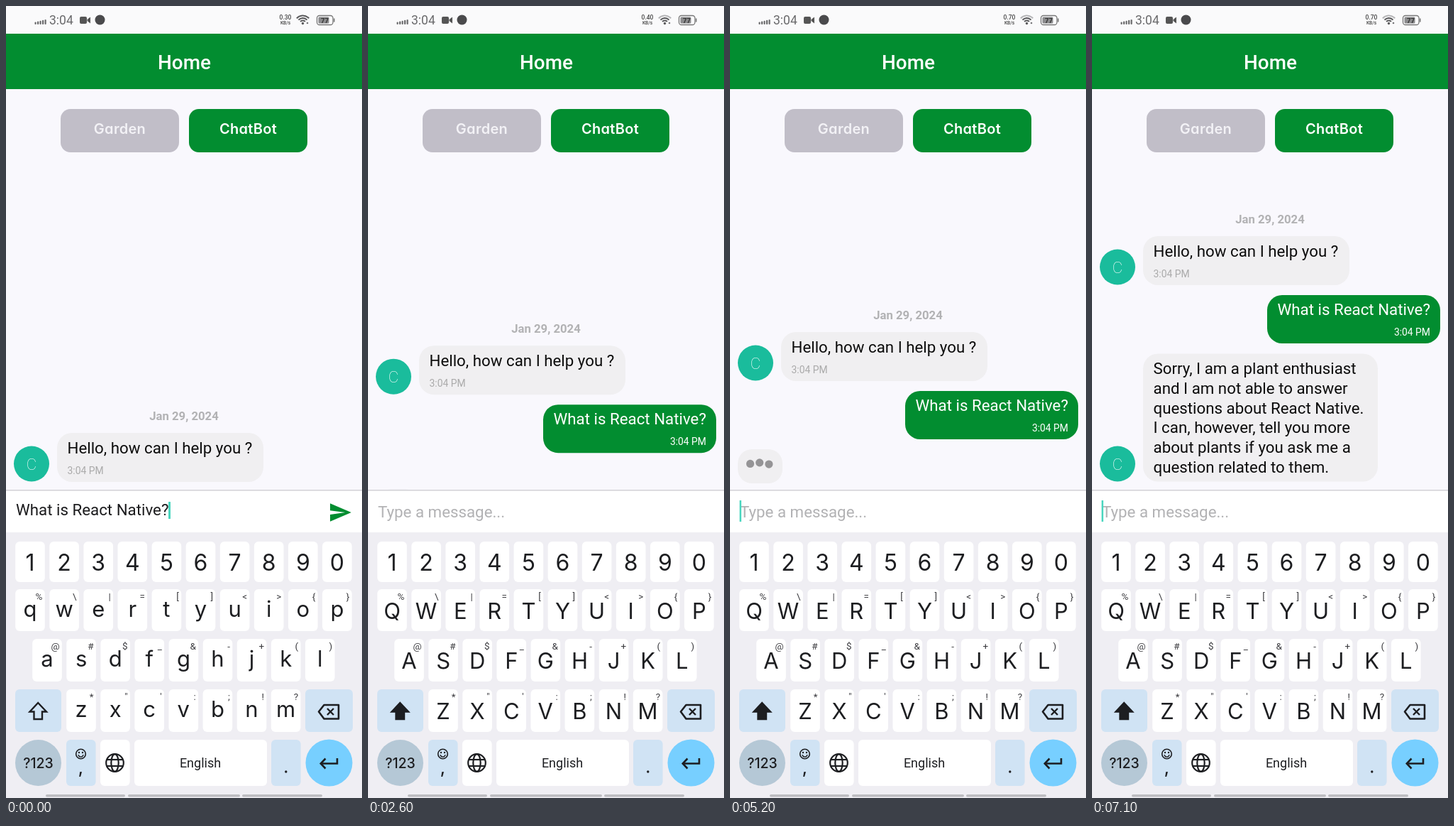
An HTML page with a canvas for the animation above (7.5 s loop, 502 by 1115 pixels).

```html
<!DOCTYPE html>
<html lang="en">
<head>
<meta charset="utf-8">
<title>Chat</title>
<style>
  html, body { margin: 0; width: 100%; height: 100%; overflow: hidden; background: #f9f8fd; }
  canvas { position: absolute; left: 0; top: 0; width: 502px; height: 1115px; }
  .tab {
    position: absolute; top: 145px; width: 167px; height: 61px; border-radius: 14px;
    font: 600 20px/57px Inter, "Open Sans", sans-serif; letter-spacing: .3px;
    font-feature-settings: "cv11"; text-align: center; color: #fff;
  }
  .garden { left: 77px; background: #c1bec8; color: #f3f2f6; }
  .bot { left: 258px; background: #028d30; }
</style>
</head>
<body>
<canvas id="stage"></canvas>
<div class="tab garden">Garden</div>
<div class="tab bot">ChatBot</div>
<script>
const W = 502, H = 1115, LOOP = 7500, STEP = 100;
const GREEN = '#028d30', INK = '#1d1e21', BUBBLE = '#f0eff1', BLUE = '#d0e3f4', ACCENT = '#4bd6bf';
const UI = 'Roboto, sans-serif', KEYS = 'Inter, sans-serif';
const SENT = 2500, ANSWERED = 5500, FROZEN = 5200;
const ANSWER = [
  'Sorry, I am a plant enthusiast', 'and I am not able to answer',
  'questions about React Native.', 'I can, however, tell you more',
  'about plants if you ask me a', 'question related to them.'
];
const ROWS = [
  { keys: 'qwertyuiop', hints: '%\\|=[]<>{}', x: 34, top: 821, h: 59 },
  { keys: 'asdfghjkl', hints: '@#$_&-+()', x: 58, top: 891, h: 60 },
  { keys: 'zxcvbnm', hints: '*"\':;!?', x: 106, top: 962, h: 60 }
];
const SEND = new Path2D('M2 21L23 12 2 3 2 10l15 2-15 2z');

const canvas = document.getElementById('stage');
const ctx = canvas.getContext('2d');
const dpr = window.devicePixelRatio || 1;
canvas.width = W * dpr;
canvas.height = H * dpr;

function rect(x, y, w, h, color) {
  ctx.fillStyle = color;
  ctx.fillRect(x, y, w, h);
}
function round(x, y, w, h, r, color) {
  ctx.fillStyle = color;
  ctx.beginPath();
  ctx.roundRect(x, y, w, h, r);
  ctx.fill();
}
function disc(x, y, r, color) {
  ctx.fillStyle = color;
  ctx.beginPath();
  ctx.arc(x, y, r, 0, Math.PI * 2);
  ctx.fill();
}
function text(str, x, y, font, color, align = 'left') {
  ctx.font = font;
  ctx.fillStyle = color;
  ctx.textAlign = align;
  ctx.fillText(str, x, y);
}
function line(pts, color, width, close) {
  ctx.strokeStyle = color;
  ctx.lineWidth = width;
  ctx.beginPath();
  pts.forEach(([x, y]) => ctx.lineTo(x, y));
  if (close) ctx.closePath();
  ctx.stroke();
}
function arc(x, y, rx, ry, from, to, color, width) {
  ctx.strokeStyle = color;
  ctx.lineWidth = width;
  ctx.beginPath();
  ctx.ellipse(x, y, rx, ry, 0, from, to);
  ctx.stroke();
}

const clamp = v => Math.max(0, Math.min(1, v));
const ease = p => p < .5 ? 2 * p * p : 1 - 2 * (1 - p) * (1 - p);
const ramp = (t, start, len) => ease(clamp((t - start) / len));

// Damped spring from 1 to 0
function spring(ms) {
  const s = Math.max(0, ms) / 1000;
  return Math.exp(-11 * s) * (Math.cos(10.45 * s) + 1.053 * Math.sin(10.45 * s));
}

function statusBar(t) {
  const grey = '#6a6a6c';
  rect(0, 0, W, 39, '#fafafb');
  for (let i = 0; i < 5; i++) round(40.5 + i * 3.5, 22.5 - i * .9, 2.2, 3.5 + i * .9, 1, grey);
  text('3:04', 61, 26, '17.5px ' + UI, grey);
  round(104, 15, 10, 10, 2, '#555');
  ctx.beginPath();
  ctx.moveTo(114.5, 19); ctx.lineTo(119, 15.5); ctx.lineTo(119, 24.5); ctx.lineTo(114.5, 21);
  ctx.fill();
  disc(132.5, 19.5, 7, '#4a4a4c');

  const rate = t < 200 ? '0.30' : t < 2800 ? '0.40' : '0.70';
  text(rate, 394, 19, '500 8.5px ' + UI, '#444', 'center');
  text('KB/s', 394, 26, '500 6.5px ' + UI, '#444', 'center');

  const weak = t >= 2200;
  [4.5, 8, 11.5].forEach((r, i) =>
    arc(418.5, 25, r, r, -Math.PI * .77, -Math.PI * .23, weak && i === 2 ? '#b5b5b7' : '#5a5a5c', 2));
  disc(418.5, 24.5, 1.7, '#5a5a5c');
  disc(425, 24, 1.3, '#77777a');

  ctx.strokeStyle = '#777';
  ctx.lineWidth = 1.3;
  ctx.beginPath();
  ctx.roundRect(438.5, 13.5, 22.5, 13, 3.5);
  ctx.stroke();
  round(440.5, 15.5, 15, 9, 1.5, '#8b8b8d');
  rect(462, 17.5, 1.5, 5, '#777');
  text('77', 449.5, 23.7, '700 9.5px ' + UI, '#333', 'center');
}

function avatar(y) {
  disc(36, y, 25, '#1abc9c');
  text('C', 36, y + 8.5, '100 22.3px ' + UI, '#fff', 'center');
}

function chat(t) {
  const sent = t >= SENT, answered = t >= ANSWERED;
  const open = ramp(t, 2450, 250) * (1 - ramp(t, 5410, 250));
  const shift = 60 * open + (sent ? 82 : 0) + (answered ? 195 : 0);
  const body = '22.3px ' + UI, small = '13.9px ' + UI;

  ctx.save();
  ctx.beginPath();
  ctx.rect(0, 220, W, 461);
  ctx.clip();
  ctx.save();
  ctx.translate(0, -shift);
  text('Jan 29, 2024', 251, 583, '700 16.7px ' + UI, '#b2b2b4', 'center');
  round(72, 601, 291, 69, 21, BUBBLE);
  avatar(644.5);
  text('Hello, how can I help you ?', 86.5, 630, body, '#0c0c0c');
  text('3:04 PM', 86.5, 658.5, small, '#aaa');
  if (sent) {
    round(247, 684, 244, 68, 21, GREEN);
    text('What is React Native?', 261.5, 712, body, '#fff');
    text('3:04 PM', 477, 741, small, '#fff', 'right');
  }
  if (answered) {
    round(72, 766.5, 331, 180, 21, BUBBLE);
    avatar(921.5);
    ANSWER.forEach((s, i) => text(s, 86.5, 795 + i * 27.8, body, '#0c0c0c'));
  }
  ctx.restore();
  if (sent && !answered) typing(t);
  ctx.restore();
}

function typing(t) {
  const drop = 279 * spring(t - 2450);
  const phase = 3.65 + (Math.min(t, FROZEN) - 3400) * .00808;
  round(11, 624 + drop, 63, 48, 20, BUBBLE);
  for (let i = 0; i < 3; i++)
    disc(28.5 + i * 13.2, 647 + 4.18 * Math.sin(phase - i) + drop, 5.6, '#959496');
}

function inputBar(t) {
  const caret = t % 1000 < 500;
  rect(0, 681, W, 60, '#fff');
  rect(0, 681, W, 1.5, '#d2d1d6');
  if (t < SENT) {
    text('What is React Native?', 14, 716.5, '22.3px ' + UI, '#1c1c1e');
    if (caret) rect(229, 698, 3, 24, ACCENT);
    ctx.save();
    ctx.globalAlpha = 1 - .8 * ramp(t, 2250, 150);
    ctx.translate(454.2, 696);
    ctx.scale(1.42, 1.42);
    ctx.fillStyle = GREEN;
    ctx.fill(SEND);
    ctx.restore();
  } else {
    text('Type a message...', 14, 719.5, '22.3px ' + UI, '#b2b2b4');
    if (caret) rect(13.5, 696, 2.5, 30, ACCENT);
  }
}

function letterRow(row, base, caps) {
  [...row.keys].forEach((k, i) => {
    const x = row.x + i * 48.1;
    round(x - 20.8, row.top, 41.6, row.h, 6, '#fff');
    text(caps ? k.toUpperCase() : k, x, base + (caps ? 3 : 0), '31px ' + KEYS, INK, 'center');
    text(row.hints[i], x + 17.5, row.top + 15, '13.5px ' + UI, '#3c3c40', 'right');
  });
}

function keyboard(caps) {
  rect(0, 741, W, H - 741, '#efeef3');
  [...'1234567890'].forEach((k, i) => {
    const x = 34 + i * 48.1;
    round(x - 20.8, 754, 41.6, 57, 6, '#fff');
    text(k, x, 795, '32px ' + KEYS, INK, 'center');
  });
  [860, 930, 1001].forEach((base, i) => letterRow(ROWS[i], base, caps));

  round(13, 962, 65, 60, 6, BLUE);
  const up = [[45.2, 981], [57, 993.5], [51, 993.5], [51, 1004], [39.5, 1004], [39.5, 993.5], [33.5, 993.5]];
  ctx.lineJoin = 'miter';
  line(up, INK, 2.4, true);
  if (caps) {
    ctx.fillStyle = INK;
    ctx.fill();
  }

  round(422, 962, 67, 60, 6, BLUE);
  ctx.lineJoin = 'round';
  line([[441, 993.5], [448.5, 984], [469, 984], [469, 1003.5], [448.5, 1003.5]], INK, 2.6, true);
  line([[453, 989], [462, 998]], INK, 2.4);
  line([[462, 989], [453, 998]], INK, 2.4);

  disc(45.5, 1065.5, 32.5, '#b5c8d6');
  text('?123', 45.5, 1072.5, '500 19.5px ' + KEYS, INK, 'center');

  round(85, 1033, 41.6, 65, 6, BLUE);
  arc(105.5, 1053, 6.8, 6.8, 0, Math.PI * 2, INK, 1.6);
  disc(103, 1051, 1.2, INK);
  disc(108, 1051, 1.2, INK);
  arc(105.5, 1053.5, 3.6, 3.6, .2, Math.PI - .2, INK, 1.5);
  text(',', 105.5, 1081, '500 24px ' + KEYS, INK, 'center');

  round(133, 1033, 41.6, 65, 6, '#fff');
  arc(153.5, 1065.5, 12.3, 12.3, 0, Math.PI * 2, INK, 2.2);
  arc(153.5, 1065.5, 5.2, 12.3, 0, Math.PI * 2, INK, 2.2);
  line([[142, 1061], [165, 1061]], INK, 2.2);
  line([[142, 1070], [165, 1070]], INK, 2.2);

  round(181, 1033, 187, 65, 6, '#fff');
  text('English', 274, 1072, '18px ' + UI, INK, 'center');

  round(374, 1033, 41.6, 65, 6, BLUE);
  disc(394.8, 1078, 1.7, INK);

  disc(455.5, 1065.5, 33, '#77cfff');
  ctx.lineJoin = 'miter';
  line([[467, 1059], [467, 1066.5], [444, 1066.5]], INK, 2.6);
  line([[450.5, 1059.5], [443.8, 1066.5], [450.5, 1073.5]], INK, 2.6);

  [[56, 112], [172, 158], [333, 113]].forEach(([x, w]) => round(x, 1110, w, 3.5, 1.7, '#bcbcc0'));
}

function draw(t) {
  ctx.setTransform(dpr, 0, 0, dpr, 0, 0);
  rect(0, 0, W, H, '#f9f8fd');
  statusBar(t);
  rect(0, 39, W, 78, GREEN);
  text('Home', 251.5, 89, '500 27.9px ' + UI, '#fff', 'center');
  chat(t);
  inputBar(t);
  keyboard(t >= SENT);
}

const start = performance.now();
function tick() {
  const t = (performance.now() - start) % LOOP;
  draw(Math.floor(t / STEP) * STEP);
  requestAnimationFrame(tick);
}
tick();
</script>
</body>
</html>
```
